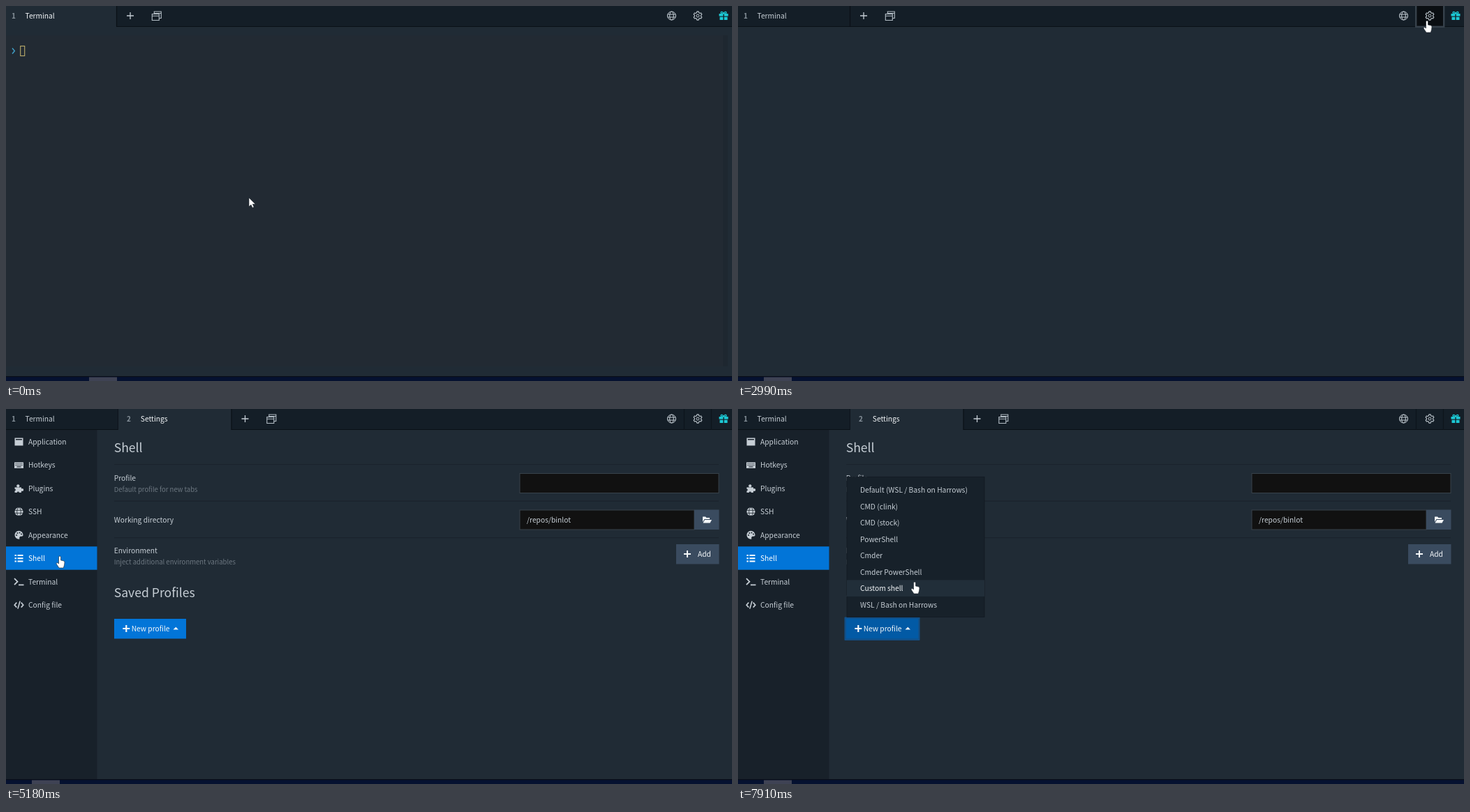
An HTML page for the animation above (7990 ms loop, 1040 px wide and 538 px high).

```html
<!DOCTYPE html>
<html lang="en">
<head>
<meta charset="utf-8">
<title>Terminal settings</title>
<style>
  html, body { margin: 0; width: 100%; height: 100%; overflow: hidden; background: #202b35; }
  svg { display: block; }
  #stage { width: 100%; height: 100%; }
  text { font-family: "Noto Sans CJK JP", "Noto Sans CJK SC", "Noto Sans CJK", sans-serif; white-space: pre; }
</style>
</head>
<body>
<svg id="stage" viewBox="0 0 1040 538"></svg>
<script>
const LOOP = 7990;
const PAGE = '#202b35', HEAD = '#141e27', PALE = '#c6ced5', DIM = '#6c7780',
      BUTTON = '#3a4b5f', DARK = '#1b252e', BLUE = '#0275d8', WHITE = '#f4f7f9';

// drawing helpers
const text = (x, y, s, fill = PALE, size = 10.26, more = '') =>
  `<text x="${x}" y="${y}" fill="${fill}" font-size="${size}" ${more}>${s}</text>`;
const mid = (x, y, s, fill = WHITE) => text(x, y, s, fill, 10.26, 'text-anchor="middle"');
const rect = (x, y, w, h, fill, more = '') =>
  `<rect x="${x}" y="${y}" width="${w}" height="${h}" fill="${fill}" ${more}/>`;
const line = (d, stroke, w = 1.2, fill = 'none') =>
  `<path d="${d}" stroke="${stroke}" stroke-width="${w}" fill="${fill}"/>`;
const shape = (d, fill) => `<path d="${d}" fill="${fill}" fill-rule="evenodd"/>`;
const disc = (x, y, r, fill, more = '') => `<circle cx="${x}" cy="${y}" r="${r}" fill="${fill}" ${more}/>`;
const at = (x, y, s) => `<g transform="translate(${x} ${y})">${s}</g>`;
const heading = (x, y, s, size, fill = PALE) => text(x, y, s, fill, size, 'font-weight="300"');

// icons, centred on 0,0
const plus = (r, w, c) => line(`M${-r} 0H${r}M0 ${-r}V${r}`, c, w);
const tabsIcon = line('M-6.5 -2.5H3.5V6.5H-6.5ZM-6.5 .2H3.5M-3.5 -2.5V-6H6.5V3.5H3.5M-3.5 -3.5H6.5', '#b4bec6', 1.1);
const globeIcon = `<g fill="none" stroke="#c3ccd3"><circle r="6"/><ellipse rx="2.8" ry="6"/></g>` +
  line('M-5.6 -2H5.6M-5.6 2H5.6', '#c3ccd3', 1);
const cog = [0, 1, 2, 3, 4, 5].flatMap(i =>
  [[-19, 4.7], [-11, 6.2], [11, 6.2], [19, 4.7]].map(([d, r]) => {
    const a = (i * 60 + 90 + d) * Math.PI / 180;
    return (r * Math.cos(a)).toFixed(2) + ' ' + (r * Math.sin(a)).toFixed(2);
  })).join('L');
const gearIcon = `<g stroke-linejoin="round">${line(`M${cog}Z`, '#bcc5cc', 1.1)}</g>` +
  disc(0, 0, 2, 'none', 'stroke="#bcc5cc"');
const giftIcon = rect(-6.5, -3, 5.8, 3.6, '#1cc8d4') + rect(.7, -3, 5.8, 3.6, '#1cc8d4') +
  rect(-5.5, 1.7, 4.8, 4.3, '#1cc8d4') + rect(.7, 1.7, 4.8, 4.3, '#1cc8d4') +
  line('M0 -3C-1 -6 -4 -6.5 -4 -4.5Q-4 -3 0 -3C1 -6 4 -6.5 4 -4.5Q4 -3 0 -3', '#1cc8d4', 1.3);
const bugIcon = `<ellipse cy="1" rx="3.2" ry="4.8" fill="${WHITE}"/>` +
  line('M-2.4 -4A2.4 2.4 0 0 1 2.4 -4ZM-6 1.2H6M-5 -4L-2.5 -1.5M5 -4L2.5 -1.5M-5 6L-2.5 3.5M5 6L2.5 3.5', WHITE, 1.5, WHITE) +
  line('M0 -1V5.5', BUTTON, .9);
const folderIcon = shape('M-6 3V-4.5H-2L-.6 -3H4V-1H-3.5ZM-5.5 4.5L-3 0H7L4.5 4.5Z', WHITE);

const menuIcons = [
  c => shape('M-6 -5.5H6V5.5H-6ZM-4.5 -4V-2.5H4.5V-4Z', c),
  c => shape('M-6.5 -4H6.5V4.5H-6.5Z', c) +
    line('M-5 -2H5.5M-5 .2H5.5', '#18212a', 1.1).replace('/>', ' stroke-dasharray="1.2 1"/>') +
    line('M-3 2.5H3', '#18212a', 1.1),
  c => rect(-6, -1.5, 9.5, 7.5, c) + disc(-1.2, -3.6, 2.1, c) + disc(4.7, 2, 2, c) +
    disc(-6, 2.2, 1.4, '#18212a') + disc(-1.2, 6, 1.4, '#18212a'),
  c => disc(0, 0, 6, c) + `<ellipse rx="2.8" ry="6" fill="none" stroke="#18212a" stroke-width=".8"/>` +
    line('M-6 -2H6M-6 2H6', '#18212a', .8),
  c => shape('M6 0C6 3 2 1 1 3S2 6 0 6A6 6 0 1 1 6 0Z', c) +
    [[-3.4, .3], [-2.1, -2.8], [1, -3.4], [3.6, -1.4]].map(([x, y]) => disc(x, y, 1, '#18212a')).join(''),
  c => line('M-6 -4.2H-3.6M-6 0H-3.6M-6 4.2H-3.6M-2 -4.2H6M-2 0H6M-2 4.2H6', c, 1.9),
  c => line('M-6.5 -4.5L-2 0L-6.5 4.5M-.5 4.6H7', c, 1.8),
  c => line('M-3.2 -3.5L-6.3 0L-3.2 3.5M3.2 -3.5L6.3 0L3.2 3.5M1.6 -5.5L-1.6 5.5', c, 1.6)
];
const menuNames = ['Application', 'Hotkeys', 'Plugins', 'SSH', 'Appearance', 'Shell', 'Terminal', 'Config file'];
const shells = ['Default (WSL / Bash on Harrows)', 'CMD (clink)', 'CMD (stock)', 'PowerShell',
  'Cmder', 'Cmder PowerShell', 'Custom shell', 'WSL / Bash on Harrows'];
const ROW = 33.45, ITEM = 23.57;

// pointer: start, first step, last step, number of steps, goal, easing
const smooth = u => u * u * (3 - 2 * u);
const out = p => u => 1 - (1 - u) ** p;
const moves = [
  [900, 1190, 5, 747, 128, u => smooth(u) ** 1.4],
  [1510, 2290, 11, 987, 21, out(3.6)],
  [3470, 3690, 4, 462, 144, smooth],
  [4010, 4790, 11, 77, 211, smooth],
  [5720, 6360, 9, 199, 310, out(2.4)],
  [7520, 7910, 6, 253, 248, smooth]
];
const clicks = [[2750, 2910, 987, 21], [4940, 5180, 77, 211], [6590, 6730, 199, 310]];

// share of a stepped change done at time t
function stepped(t, from, to, n) {
  if (t < from) return 0;
  return Math.min(n, Math.floor((t - from + 1) / ((to - from) / (n - 1))) + 1) / n;
}

function pointer(t) {
  let x = 348, y = 275;
  for (const [from, to, n, gx, gy, ease] of moves) {
    const u = ease(stepped(t, from, to, n));
    x += (gx - x) * u;
    y += (gy - y) * u;
  }
  return { x, y };
}

const inside = (p, x, y, w, h) => p.x >= x && p.x < x + w && p.y >= y && p.y < y + h;

function header(t) {
  const split = t >= 2910;
  const first = split ? 160.5 : 158.5;
  const grown = 162.5 * smooth(stepped(t, 3070, 3320, 4));
  const end = first + grown;
  let s = rect(0, 0, 1040, 30, HEAD) + line('M0 29.5H1040', '#0a1016', 1.2);
  if (!split) s += rect(0, 0, first, 31, PAGE);
  s += line(`M${first} 0V30`, '#0a1016', 1.2);
  s += text(8, 18, '1', '#87929b', 10, 'font-weight="700"') +
       text(27.5, 18, 'Terminal', split ? PALE : WHITE);
  if (grown) {
    s += `<svg x="${first}" width="${grown}" height="31">` + rect(0, 0, 163, 31, PAGE) +
      text(12.5, 18, '2', '#87929b', 10, 'font-weight="700"') + text(32.3, 18, 'Settings', WHITE) + '</svg>' +
      line(`M${end} 0V30`, '#0a1016', 1.2);
  }
  s += at(end + 19.5, 14, plus(5, 1.3, '#c3ccd3')) + at(end + 57.3, 14, tabsIcon);
  if (t >= 2750 && t < 4940) {
    s += rect(971.2, -3, 40, 32.8, t < 3070 ? '#0a0e12' : HEAD, 'stroke="#36414b" stroke-width="2.4"');
  } else if (t >= 4940) {
    s += line('M971.5 0V30M1010.5 0V30', '#0d151c', 1.2);
  }
  return s + at(953.5, 14, globeIcon) + at(991, 14, gearIcon) + at(1028, 14, giftIcon);
}

const terminal = rect(0, 42, 1027, 475, '#222a33') + rect(1027, 42, 7, 475, '#1e2730') +
  line('M9 60.5L12.3 64.5L9 68.5', '#3f9cc4', 1.5) +
  rect(20.7, 57.5, 6, 14, 'none', 'stroke="#b9aa6a" stroke-width="1.1"');

function sidebar(active, hover) {
  return rect(0, 30, 130.5, 501, '#18212a') + menuNames.map((name, i) => {
    const y = 47 + ROW * i;
    const c = i === active || i === hover ? '#fff' : PALE;
    return (i === active ? rect(0, 30 + ROW * i, 130.5, ROW, BLUE) : '') +
      at(18.5, y, menuIcons[i](c)) + text(32, y + 4, name, c);
  }).join('');
}

const dividers = (y, n) => Array.from({ length: n }, (_, i) =>
  line(`M155 ${y + 52.55 * i}H1021`, '#1a232c', 1.2)).join('');
const setting = (y, label, note) => text(154.7, y, label) + (note ? text(154.7, y + 16, note, DIM, 9.53) : '');
const field = (y, w) => rect(736, y, w, 28, '#111', 'stroke="#38424a"');
const toggle = y => rect(978, y, 34.5, 19.5, '#1e2831', 'rx="2" stroke="#4b565f" stroke-width="1.8"') +
  rect(980.5, y + 2.5, 14.5, 14.5, '#46515b');

const application = dividers(110, 8) +
  heading(155, 75.5, 'Terminus', 30.8, '#a3c9ea') +
  `<text x="289.5" y="62.5" font-size="25" fill="#6f3cc0" style="font-family:'Open Sans','Noto Sans',sans-serif">α</text>` +
  text(310.5, 70.5, '1.0.81', DIM) +
  rect(816, 52, 71, 28.5, BUTTON) + disc(833, 66, 6, WHITE) + text(842, 70, 'BinLot', WHITE) +
  rect(900, 52, 121.5, 28.5, BUTTON) + at(917, 66, bugIcon) + text(926, 70, 'Report a problem', WHITE) +
  setting(140, 'Theme') + field(122.5, 285) + text(746, 140, 'Standard', PALE) +
  setting(193, 'Tabs location') +
  rect(864, 172, 70, 28, DARK) + mid(898.5, 190, 'On the top') +
  rect(935, 172, 86.5, 28, BUTTON) + mid(977.5, 190, 'At the bottom') +
  setting(238, 'Acrylic background', 'Gives the window a blurred transparent background') + toggle(231.5) +
  setting(298, 'Transparency') + line('M916 295.5H1016', '#0d1114', 3) + disc(1016.5, 295.5, 5, '#a9aeb2') +
  setting(343, 'Shell integration', 'Allows quickly opening a terminal in the selected folder') + toggle(336.7) +
  setting(396, 'Window frame', 'Whether a custom window or an OS native window should be used') +
  rect(889, 382, 93, 28.5, BUTTON) + rect(982, 382, 39, 28.5, DARK) +
  mid(915, 400, 'Native') + mid(961.5, 400, 'Thin') + mid(1001.5, 400, 'Full') +
  setting(448.5, 'Dock the terminal', 'Snaps the window to a side of the screen') +
  rect(807, 434.5, 34.5, 28.5, DARK) + rect(841.5, 434.5, 180, 28.5, BUTTON) +
  [['Off', 824], ['Top', 860.5], ['Left', 899], ['Right', 941.5], ['Bottom', 992.5]]
    .map(([s, x]) => mid(x, 453, s)).join('') +
  setting(509, 'Debugging') +
  rect(912, 490, 109.5, 28.5, BUTTON) + at(929, 504, bugIcon) + text(938, 508.5, 'Open DevTools', WHITE);

function shellPage(t, p) {
  let s = heading(154.7, 61.5, 'Shell', 17.6) + dividers(79.5, 3) +
    setting(102.5, 'Profile', 'Default profile for new tabs') + field(92.5, 285) +
    setting(163, 'Working directory') + field(145, 250) + text(746, 163, '/repos/binlot', PALE) +
    rect(986, 144.5, 35.5, 28.5, BUTTON) + at(1004, 159, folderIcon) +
    setting(207, 'Environment', 'Inject additional environment variables') +
    rect(960, 194, 61.5, 28.5, BUTTON) + at(976, 208, plus(5, 2, WHITE)) + text(991, 212, 'Add', WHITE) +
    heading(154.7, 269.5, 'Saved Profiles', 17.6);
  const pressed = t >= 6590;
  const fill = pressed ? '#025aa5' : inside(p, 155, 301, 103, 29) ? '#0260b2' : BLUE;
  if (pressed) s += rect(152.5, 298.5, 108, 33.5, '#11508a', 'rx="1"');
  s += rect(155, 301, 103, 28.5, fill) + at(172.3, 315, plus(5, 2.2, WHITE)) +
    text(179.7, 319, 'New profile', WHITE) + shape('M239.5 316.5L243.3 312.7L247 316.5Z', WHITE);
  if (t >= 6660) {
    s += rect(156, 97.5, 197, 201, '#17212a', 'stroke="#121a22" stroke-width=".8"') +
      shells.map((name, i) => {
        const y = 104 + ITEM * i;
        const on = inside(p, 156, y, 197, ITEM);
        return (on ? rect(156, y, 197, ITEM, '#212e39') : '') + text(175, y + 16, name, on ? WHITE : PALE);
      }).join('');
  }
  return s;
}

const ARROW = 'M0 0V12.8L3 10.2L5 14.4L7.2 13.4L5.3 9.3H9.2Z';
const HAND = 'M-1.5 1.5Q-1.5 0 0 0T1.5 1.5V6L5.2 6.8Q7 7.2 7 9L6.5 13L5.3 17H-1L-4.5 11.8Q-5.3 10.3 -4.2 9.7T-2 10.4L-1.5 11Z';

function scene(t) {
  const p = pointer(t);
  const settings = t >= 3150, shell = t >= 5180;
  const inBar = settings && inside(p, 0, 30, 130, ROW * 8);
  const onButton = shell && inside(p, 155, 301, 103, 29);
  const onItem = t >= 6660 && inside(p, 156, 104, 197, ITEM * 8);
  const onGear = t >= 2360 && t < 3470;
  const hand = inBar || onButton || onItem || onGear;

  let s = rect(0, 0, 1040, 538, PAGE);
  if (t < 2910) s += terminal;
  if (settings) {
    s += shell ? shellPage(t, p) : application;
    s += sidebar(shell ? 5 : 0, inBar ? Math.floor((p.y - 30) / ROW) : -1);
  }
  s += header(t) + rect(0, 531, 1040, 7, '#051130') + rect(0, 531, 1040, 1.2, '#0a0e18') +
    rect(t < 2910 ? 119 : 37, 532.5, 40, 6, '#3f4354');
  for (const [from, to, x, y] of clicks)
    if (t >= from && t < to) s += disc(x, y, 10, '#8f8f12');
  return s + at(p.x.toFixed(1), p.y.toFixed(1), line(hand ? HAND : ARROW, '#182029', .6, '#fff'));
}

const stage = document.getElementById('stage');
let shown = '';
function frame(now) {
  const next = scene(now % LOOP);
  if (next !== shown) stage.innerHTML = shown = next;
  requestAnimationFrame(frame);
}
frame(performance.now());
</script>
</body>
</html>
```
